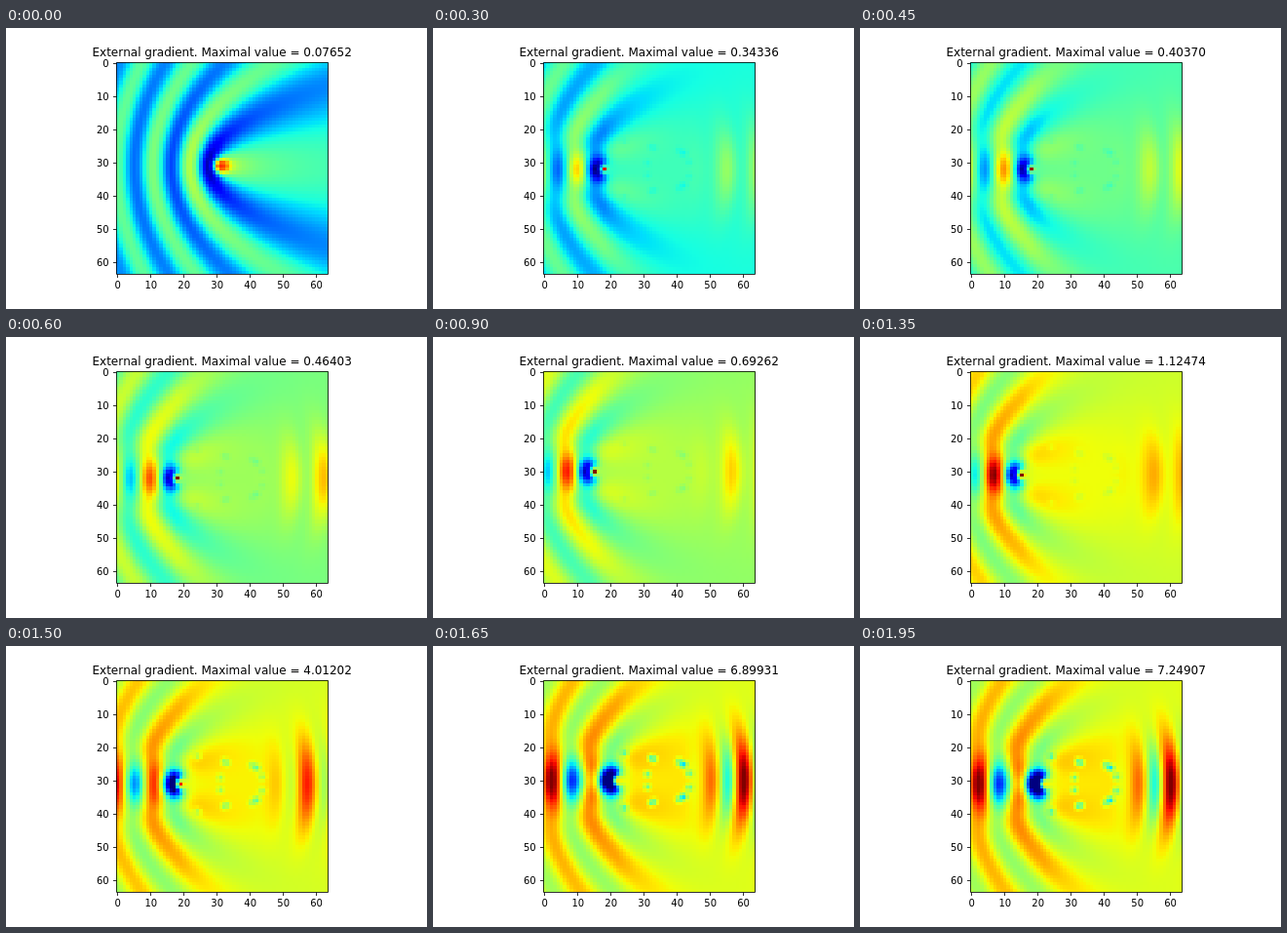
An HTML page with a canvas that plays this animation: 432 px wide and 288 px high, repeating every 2100 ms.

```html
<!DOCTYPE html>
<html lang="en">
<head>
<meta charset="utf-8">
<title>External gradient</title>
<style>
  html, body { margin: 0; width: 100%; height: 100%; overflow: hidden; background: #fff; }
  canvas { position: absolute; left: 113px; top: 34px; width: 218px; height: 218px; clip-path: inset(1px 0 0); image-rendering: pixelated; }
  svg { position: absolute; left: 0; top: 0; }
  text { font: 10px "DejaVu Sans", sans-serif; font-kerning: none; text-anchor: middle; }
  #title { font-size: 12px; }
  path { fill: none; stroke: #000; stroke-width: .8; }
</style>
</head>
<body>
<canvas id="map" width="64" height="64"></canvas>
<svg id="axes" width="432" height="288">
  <path d="M113.5 35.5H330.5V252.5H113.5Z"/>
  <text id="title" x="221.7" y="28.6"></text>
</svg>
<script>
const N = 64, STEP = 150, STEPS = 14;

// Key values by step, joined linearly
const tracks = {
  max: { 0: .07652, 2: .34336, 4: .46403, 6: .69262, 9: 1.12474, 11: 6.89931, 13: 7.24907 },
  row: { 0: 31, 2: 32, 4: 32, 6: 30, 9: 31, 11: 30, 13: 31 },
  tip: { 0: 31, 2: 18, 4: 18, 6: 15, 9: 15, 11: 22 },
  base: { 0: .36, 2: .385, 4: .5, 6: .53, 9: .6, 11: .625 },
  amp: { 0: .41, 2: .48, 9: .66, 11: 1 },
  beam: { 0: 0, 2: .13, 4: .17, 6: .12, 9: .11, 11: .35 },
  front: { 2: 54, 4: 51.5, 6: 56, 9: 54, 11: 60 }
};

const clamp = v => Math.min(1, Math.max(0, v));
const ramp = (v, a, b) => clamp((v - a) / (b - a));
const bell = v => Math.exp(-v * v);
const ripple = (u, dark, period) => -Math.cos((u - dark) / period * 2 * Math.PI);

function valueAt(track, step) {
  const keys = Object.keys(track).map(Number);
  const b = keys.find(k => k >= step) ?? keys.at(-1);
  const a = keys.findLast(k => k <= step) ?? b;
  return track[a] + (track[b] - track[a]) * (a < b ? ramp(step, a, b) : 0);
}

let seed = 7;
const random = () => (seed = seed * 16807 % 2147483647) / 2147483647;
const specks = Array.from({ length: 8 }, () => ({ x: 24 + 24 * random(), d: 9 * random() }));

function makeField(step) {
  const s = {};
  for (const name in tracks) s[name] = valueAt(tracks[name], step);
  const row = Math.round(s.row), tip = Math.round(s.tip);
  const lobed = ramp(step, 0, 2);   // wide fronts split into a central beam and side lobes
  const late = ramp(step, 9, 11);   // strong reflections at both edges

  return (x, y) => {
    const dx = x - tip, dy = y - row, r = Math.hypot(dx, dy), u = r - dx;
    const decay = Math.sqrt(2.5 / Math.max(r, 2.5)) * (1 - bell(r / 1.5));
    const behind = lobed * Math.max(0, dx);

    // Parabolic fronts reflected to the left of the tip
    const centre = 1 - lobed * (1 - bell(dy / (5 + Math.abs(dx) / 4)));
    const main = s.amp * centre * ripple(u, 8 - 2.5 * lobed, 22 + lobed) * Math.exp(-behind / 3);
    const side = .32 * (1 - centre) * ripple(u, 12, 23) * Math.exp(-behind / 15);
    const dip = -.5 * late * bell((dx + 8.5) / 4) * bell(dy / 5);

    // Fronts leaving on the right
    const trough = .9 * late;
    const wave = -ripple(x + dy * dy / 150, s.front, 10.5);
    const right = s.beam * bell(dy / 13) * ramp(x, 40, 56) ** 2
      * (wave * (1 + trough) + 1 - trough) / 2;

    const swell = .04 * lobed * bell(dy / 14);
    const hot = .5 * (1 - late) * bell(r / (2 - 1.4 * lobed));
    const dots = specks.reduce((sum, p) => sum + bell(x - p.x) * bell(Math.abs(dy) - p.d), 0);
    return s.base + (main + side) * decay + dip + right + swell + hot
      - (.03 * lobed + .15 * late) * dots;
  };
}

const jet = v => [
  ramp(v, .35, .66) - .5 * ramp(v, .89, 1),
  ramp(v, .125, .375) - ramp(v, .64, .91),
  .5 + .5 * ramp(v, 0, .11) - ramp(v, .34, .65)
];

const axes = document.getElementById('axes'), title = document.getElementById('title');
const ctx = document.getElementById('map').getContext('2d');
const image = ctx.createImageData(N, N);

function add(tag, attrs, text = '') {
  const el = document.createElementNS('http://www.w3.org/2000/svg', tag);
  for (const k in attrs) el.setAttribute(k, attrs[k]);
  el.textContent = text;
  axes.append(el);
}

for (let n = 0; n <= 60; n += 10) {
  const offset = (n + .5) * 217.44 / N, x = 112.68 + offset, y = 34.56 + offset;
  add('path', { d: `M${Math.round(x) + .5} 252.5v3.5M113.5 ${Math.round(y) + .5}h-3.5` });
  add('text', { x: x + .4, y: 267 }, n);
  add('text', { x: 105.7, y: y + 3.8, style: 'text-anchor:end' }, n);
}

function draw(step) {
  const field = makeField(step);
  for (let i = 0; i < N * N; i++) {
    const rgb = jet(clamp(field(i % N, Math.floor(i / N))));
    image.data.set([...rgb.map(c => Math.round(255 * clamp(c))), 255], i * 4);
  }
  ctx.putImageData(image, 0, 0);
  title.textContent = 'External gradient. Maximal value = ' + valueAt(tracks.max, step).toFixed(5);
}

let shown = -1;
const start = performance.now();
function tick() {
  const step = Math.floor((performance.now() - start) / STEP) % STEPS;
  if (step !== shown) draw(shown = step);
  requestAnimationFrame(tick);
}
tick();
</script>
</body>
</html>
```
